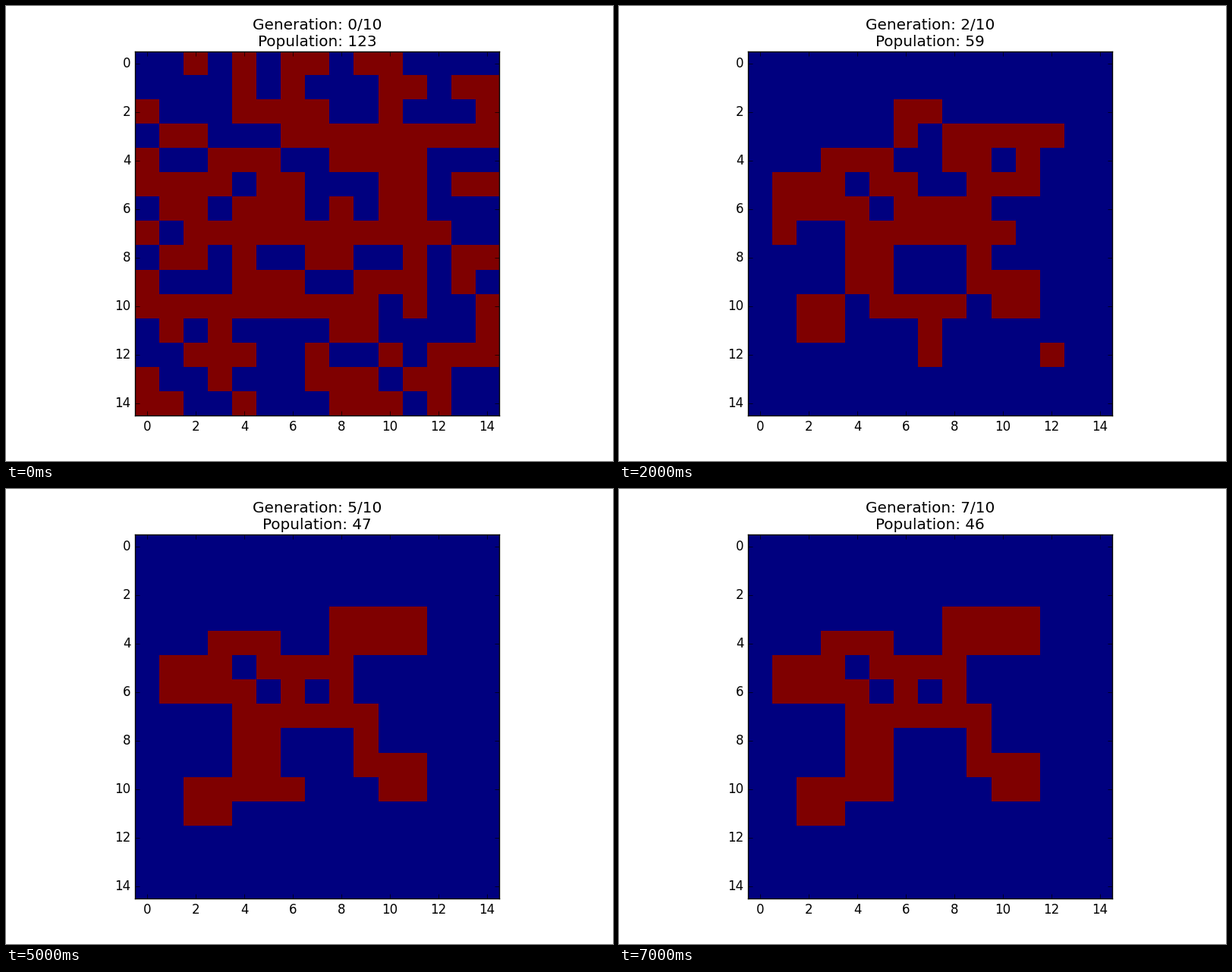
A matplotlib script for the animation above (8000 ms loop, 800 by 600 pixels).

```python
import matplotlib.pyplot as plt
import numpy as np
from matplotlib.animation import FuncAnimation

SHOWN = 8
TOTAL = 10
START = """
..#.#.##.##....
....#.#...##.##
#...####..#...#
.##...#########
#..###..####...
####.##...##.##
.##.###.#.##...
#.###########..
.##.#..##..#.##
#...###..###.#.
##########.#..#
.#.#....##....#
..###..#..#.###
#..#...###.##..
##..#...###.#..
""".split()


def step(grid):
    """Cells update in place, row by row, counting four neighbours."""
    cells = np.pad(grid, 1)
    rows, cols = grid.shape
    for r in range(1, rows + 1):
        for c in range(1, cols + 1):
            near = (cells[r - 1, c] + cells[r + 1, c]
                    + cells[r, c - 1] + cells[r, c + 1])
            cells[r, c] = near == 3 or (near == 2 and cells[r, c])
    return cells[1:-1, 1:-1]


boards = [np.array([[int(ch == "#") for ch in row] for row in START])]
while len(boards) < SHOWN:
    boards.append(step(boards[-1]))

plt.style.use("classic")
plt.rcParams.update({"figure.facecolor": "white", "font.family": "DejaVu Sans"})
fig, ax = plt.subplots(figsize=(8, 6), dpi=100)

# The board is one pixel larger than the axes, to the right and the top.
low, high, pixel = -0.5, 14.5, 1 / 32
image = ax.imshow(boards[0], cmap="jet", vmin=0, vmax=1, interpolation="nearest",
                  extent=(low, high + pixel, high, low - pixel))
ax.set_xlim(low, high)
ax.set_ylim(high, low)
ax.set_xticks(range(0, 15, 2))
ax.set_yticks(range(0, 15, 2))
title = ax.set_title("", y=1.0)


def draw(generation):
    board = boards[generation]
    image.set_data(board)
    title.set_text(f"Generation: {generation}/{TOTAL}\nPopulation: {board.sum()}")
    return image, title


anim = FuncAnimation(fig, draw, frames=SHOWN, interval=1000, repeat=True,
                     repeat_delay=0, blit=False)
plt.show()
```
